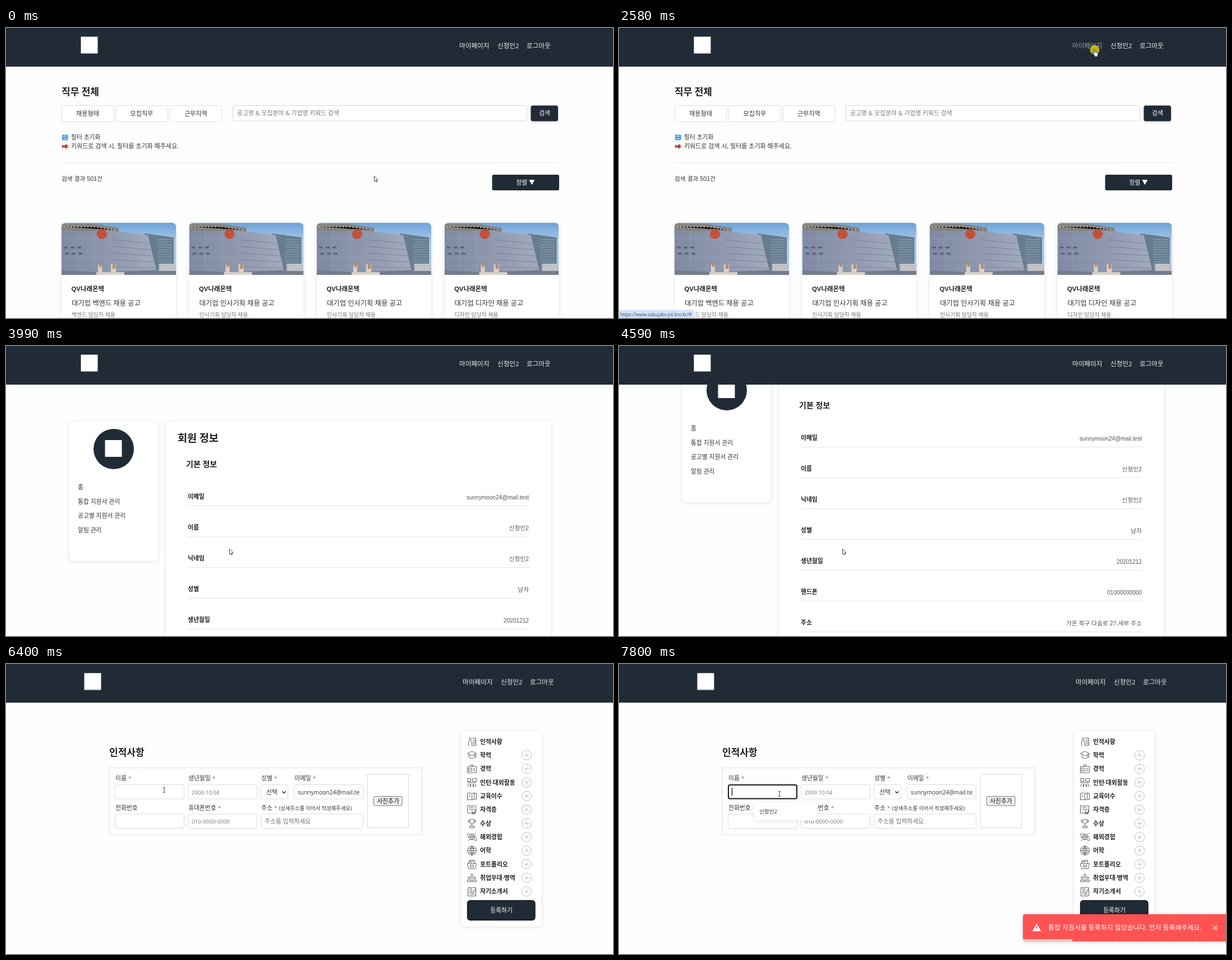
Write an HTML page that moves like this. It is 1082 px wide and 518 px high and loops after 8 s.

```html
<!DOCTYPE html>
<html lang="ko">
<head>
<meta charset="utf-8">
<title>채용 마이페이지</title>
<style>
html, body { margin: 0; width: 100%; height: 100%; overflow: hidden; background: #fefefe; }
svg { display: block; width: 100%; height: 100%; }
text { font: 10.8px "Open Sans", "Noto Sans CJK KR", sans-serif; fill: #333; white-space: pre; }
.arial { font-family: "Liberation Sans", "Noto Sans CJK KR", sans-serif; }
.b { font-weight: 600; fill: #1c1f24; }
.mid { text-anchor: middle; }
.end { text-anchor: end; fill: #555; }
.w { fill: #fff; }
.hint { fill: #777; }
.h1 { font-size: 17px; }
.nav { font-size: 11.6px; fill: #f1f1f1; }
.star { fill: #e2673c; }
.dark { fill: #212b36; }
.box { fill: #fff; stroke: #dcdcdc; }
.rule { stroke: #e6e6e6; }
.card { fill: #fff; filter: drop-shadow(0 1px 3px rgba(0,0,0,.12)); }
.icon { fill: none; stroke: #4a4f55; stroke-width: .9; stroke-linejoin: round; }
.plus { fill: none; stroke: #b9bcc0; }
.url { font-size: 8.2px; fill: #3d4a5c; }
.bar { fill: #d3e3fd; }

.k { animation: 8s step-end infinite; }
#list { animation-name: list; }
#mypage { animation-name: mypage; }
#form { animation-name: form; }
#head { animation-name: head; }
#navMy { animation-name: navMy; }
#navUser { animation-name: navUser; }
#url1 { animation-name: url1; }
#url2 { animation-name: url2; }
#before { animation-name: before; }
#after { animation-name: after; }
#scroll { animation-name: scroll; }
#focus { animation-name: focus; }
#fill { animation-name: fill; }
#toast { animation-name: toast; }
#left { animation: left 8s steps(6) infinite; transform-origin: 720px 0; }
#cursor { animation-name: cursor; }
#arrow { animation-name: arrow; }
#hand { animation-name: hand; }
#beam { animation-name: beam; }
#click { animation-name: click; }

@keyframes list { 0% { opacity: 1 } 34.9%, to { opacity: 0 } }
@keyframes mypage { 0% { opacity: 0 } 34.9% { opacity: 1 } 74.9%, to { opacity: 0 } }
@keyframes form { 0% { opacity: 0 } 74.9%, to { opacity: 1 } }
@keyframes head { 0% { transform: none } 74.9%, to { transform: translate(6px, .5px) } }
@keyframes navMy {
  0%, 17.2%, 37.4%, to { fill: #f1f1f1 }
  14.7%, 19.7% { fill: #9a9fa5 }
}
@keyframes navUser { 0%, 19.7%, to { fill: #f1f1f1 } 17.2% { fill: #9a9fa5 } }
@keyframes url1 { 0%, 34.9%, to { opacity: 0 } 24.7% { opacity: 1 } }
@keyframes url2 { 0%, 39.9%, to { opacity: 0 } 34.9% { opacity: 1 } }
@keyframes before { 0% { opacity: 1 } 39.9%, to { opacity: 0 } }
@keyframes after { 0% { opacity: 0 } 39.9%, to { opacity: 1 } }
@keyframes scroll {
  0% { transform: none }
  54.8% { transform: translateY(-60px) }
  57.3%, to { transform: translateY(-105px) }
}
@keyframes focus { 0% { opacity: 0 } 87.4%, to { opacity: 1 } }
@keyframes fill { 0% { opacity: 0 } 89.9%, to { opacity: 1 } }
@keyframes toast {
  0% { transform: translateX(400px) }
  87.4% { transform: translateX(35px) }
  89.9% { transform: translateX(3px) }
  92.4%, to { transform: none }
}
@keyframes left { 0%, 82.4% { transform: none } 97.4%, to { transform: scaleX(.243) } }
@keyframes cursor {
  0% { transform: translate(656px, 264px) }
  2.3% { transform: translate(704px, 218px) }
  4.8% { transform: translate(776px, 138px) }
  7.3% { transform: translate(818px, 95px) }
  12.2% { transform: translate(835px, 63px) }
  14.7% { transform: translate(852px, 37px) }
  17.2% { transform: translate(893px, 33px) }
  19.7% { transform: translate(855px, 36px) }
  24.7% { transform: translate(851px, 37px) }
  29.7% { transform: translate(848px, 38px) }
  34.9% { transform: translate(849px, 39px) }
  37.4% { transform: translate(842px, 52px) }
  39.9% { transform: translate(520px, 250px) }
  42.3% { transform: translate(285px, 356px) }
  47.4% { transform: translate(350px, 359px) }
  49.8% { transform: translate(398px, 362px) }
  59.8% { transform: translate(340px, 318px) }
  62.3% { transform: translate(262px, 252px) }
  64.8% { transform: translate(216px, 203px) }
  67.3% { transform: translate(199px, 182px) }
  69.8% { transform: translate(196px, 177px) }
  77.4% { transform: translate(245px, 204px) }
  79.9% { transform: translate(282px, 225px) }
  82.4% { transform: translate(284px, 227px) }
  84.9%, to { transform: translate(286px, 232px) }
}
@keyframes arrow { 0%, 37.4%, 74.9% { opacity: 1 } 14.7%, 67.3%, 79.9%, to { opacity: 0 } }
@keyframes hand { 0%, 37.4%, 74.9%, to { opacity: 0 } 14.7%, 67.3% { opacity: 1 } }
@keyframes beam { 0% { opacity: 0 } 79.9%, to { opacity: 1 } }
@keyframes click {
  0%, 34.9%, 74.9%, 89.9%, to { opacity: 0 }
  32.2%, 72.4%, 87.4% { opacity: .68 }
}
</style>
</head>
<body>
<svg viewBox="0 0 1082 518">
  <defs>
    <linearGradient id="sky" x2="0" y2="1">
      <stop stop-color="#6ca3da"/><stop offset=".35" stop-color="#a9c8e6"/>
    </linearGradient>
    <linearGradient id="wall" x2="1">
      <stop stop-color="#7f8aa3"/><stop offset=".45" stop-color="#8d96ac"/><stop offset="1" stop-color="#a3abbd"/>
    </linearGradient>
    <clipPath id="photoClip"><path d="M0 93V8q0-8 8-8h188q8 0 8 8v85z"/></clipPath>
    <clipPath id="mailClip"><path d="M519 216h112v25H519z"/></clipPath>
    <g id="photo" clip-path="url(#photoClip)">
      <path fill="url(#sky)" d="M0 0h204v93H0z"/>
      <path fill="#85827f" d="M0 2h58l44 7v8L0 15z"/>
      <path stroke="#b4b3b1" stroke-dasharray="2 4" stroke-width="3" d="M4 7h54l40 6"/>
      <path fill="#667c8f" d="M148 19l52 7v67h-52z"/>
      <path stroke="#8499ab" stroke-dasharray="1.5 3" stroke-width="26" d="M184 29v60"/>
      <path fill="url(#wall)" d="M0 13l42 2 36-2 76 9 17 71H0z"/>
      <path fill="none" stroke="#707a92" stroke-width=".8" d="M88 30l68 7M89 42l70 6M90 54l72 5M91 66l74 4M92 78l75 3"/>
      <path fill="none" stroke="#9ba4b7" stroke-width=".6" d="M0 30l86-2M0 62l88-1M28 14v79M58 14v79M88 14l6 79"/>
      <path stroke="#56627b" stroke-width="3" stroke-dasharray="7 5" d="M4 44h36M6 55h34"/>
      <path fill="#747c8d" d="M0 85l70 3 134-5v10H0z"/>
      <path fill="#d8d0c8" d="M65 75h7v18h-7zM88 74h9v19h-9zM62 88h50v5H62z"/>
      <path fill="#b98a66" d="M67 70h4v9h-4zM91 74h5v8h-5z"/>
      <path fill="#bfc3c8" d="M174 73h30v13h-30z"/>
      <circle cx="72" cy="20" r="9" fill="#c4503c"/>
    </g>
  </defs>

  <g id="list" class="k">
    <text class="b h1" x="99" y="120">직무 전체</text>
    <g id="filters"></g>
    <rect class="box" x="404.5" y="138.5" width="524" height="27.5" rx="3.5" style="stroke:#d2d6da"/>
    <text class="hint" x="412" y="155.5">공고명 &amp; 모집분야 &amp; 기업명 키워드 검색</text>
    <rect class="dark" x="935.5" y="138.5" width="48.5" height="28" rx="3.5" style="filter:drop-shadow(0 1px 2px #0003)"/>
    <text class="mid w" x="960" y="156">검색</text>
    <rect x="100" y="190.5" width="10.5" height="10" rx="1.8" fill="#3b9fe4"/>
    <path d="M102.5 195a2.8 2.8 0 0 1 5-1.200M108 196a2.8 2.8 0 0 1-5 1.2" fill="none" stroke="#fff" stroke-width="1.2"/>
    <text x="116" y="198.5">필터 초기화</text>
    <path fill="#c92f33" d="M100 209h3v5h-3zM104 209.500l5-2v8l-5-2z"/>
    <path stroke="#7c1d22" d="M104.5 209v5M110.5 209.500v4"/>
    <text x="116" y="214.5" style="font-size:11px">키워드로 검색 시, 필터를 초기화 해주세요.</text>
    <path class="rule" d="M99 240.500h887"/>
    <text class="arial" x="99" y="273" style="font-size:10.7px">검색 결과 501건</text>
    <rect class="dark" x="866.5" y="262" width="119.5" height="28" rx="3"/>
    <text class="mid w" x="926" y="280">정렬 ▼</text>
    <g id="cards"></g>
  </g>

  <g id="mypage" class="k">
    <g id="scroll" class="k">
      <rect class="card" x="113" y="134.5" width="158" height="249.5" rx="7"/>
      <circle class="dark" cx="192" cy="184" r="36"/>
      <path class="w" d="M176.500 168h30v30h-30z"/>
      <g id="menu"></g>
      <rect class="card" x="285" y="134.5" width="686.5" height="700" rx="7"/>
      <text class="b" x="306" y="170.5" style="font-size:18.5px">회원 정보</text>
      <text class="b" x="321" y="216" style="font-size:14px">기본 정보</text>
      <g id="rows"></g>
      <text id="before" class="k end" x="932" y="438">여자</text>
      <g id="after" class="k"></g>
    </g>
  </g>

  <g id="form" class="k">
    <text class="b h1" x="184" y="164">인적사항</text>
    <rect class="box" x="184" y="185.5" width="557.5" height="119.5"/>
    <g id="fields"></g>
    <text x="464" y="232.5">선택</text>
    <path d="M492.500 227.500l3 3 3-3" fill="none" stroke="#222" stroke-width="1.5"/>
    <text class="hint" x="331" y="232.5" style="font-size:9.7px">2000.10.04</text>
    <text clip-path="url(#mailClip)" x="520" y="232.5" style="font-size:10.2px">sunnymoon24@mail.test</text>
    <text class="hint" x="331" y="285" style="font-size:9.8px">010-0000-0000</text>
    <text class="hint" x="461" y="285">주소를 입력하세요</text>
    <rect class="box" x="644.5" y="197" width="73" height="95.5"/>
    <rect x="655.5" y="236.5" width="50.5" height="16.5" rx="2" fill="#efefef" stroke="#767676"/>
    <text class="mid" x="681" y="249" style="fill:#111">사진추가</text>
    <g id="focus" class="k">
      <rect x="195" y="216" width="122" height="24.5" rx="3" fill="#fff" stroke="#15181c" stroke-width="2"/>
      <path stroke="#111" stroke-width="1.3" d="M201.500 221v14"/>
    </g>
    <g id="fill" class="k">
      <rect class="card" x="241" y="247" width="112" height="32.5" rx="4"/>
      <text x="250" y="266.5" style="font-size:9.6px">신청인2</text>
    </g>
    <rect class="card" x="811" y="120" width="143.5" height="348.5" rx="4"/>
    <g id="parts"></g>
    <rect class="dark" x="822.5" y="422.5" width="120.5" height="35" rx="5" stroke="#0f151c" stroke-width="1.3"/>
    <text class="mid w" x="883" y="444">등록하기</text>
    <g id="toast" class="k">
      <rect x="720" y="447" width="400" height="48.5" rx="4" fill="#ff5252" style="filter:drop-shadow(0 1px 3px #0003)"/>
      <path class="w" stroke="#fff" stroke-width="1.5" stroke-linejoin="round" d="M744.500 465l6.500 11.500h-13z"/>
      <path stroke="#ff5252" stroke-width="1.7" d="M744.500 468v4.200m0 1.300v1.600"/>
      <text class="w" x="765" y="474.5" style="font-size:11.9px">통합 지원서를 등록하지 않았습니다. 먼저 등록해주세요.</text>
      <path stroke="#ffa8a8" stroke-width="2.6" d="M1059 467.500l7 7m0-7l-7 7"/>
      <rect id="left" x="720" y="491.5" width="362" height="4" fill="#fff" opacity=".7"/>
    </g>
  </g>

  <path class="dark" d="M0 0h1082v69H0z"/>
  <g id="head" class="k">
    <path class="w" d="M133.500 15.500h30v30h-30z"/>
    <text id="navMy" class="k nav" x="808" y="36">마이페이지</text>
    <text id="navUser" class="k nav" x="876" y="36">신청인2</text>
    <text class="nav" x="928" y="36">로그아웃</text>
  </g>

  <g id="url1" class="k">
    <path class="bar" d="M0 503.500h131q3.500 0 3.500 3.500v11H0z"/>
    <text class="url" x="2" y="514.5">https://www.sabujaks-jot.kro.kr/#</text>
  </g>
  <g id="url2" class="k">
    <path class="bar" d="M0 503.500h190q3.500 0 3.500 3.500v11H0z"/>
    <text class="url" x="2" y="514.5">https://www.sabujaks-jot.kro.kr/seeker/mypage#</text>
  </g>

  <g id="cursor" class="k">
    <circle id="click" class="k" r="8.5" cy="1" fill="#ffee00"/>
    <path id="arrow" class="k" d="M.5.5v9.600l2.200-2 1.500 3.400 1.500-.7-1.500-3.300h2.900z" fill="#fff" stroke="#222" stroke-width=".8"/>
    <path id="hand" class="k" d="M-1 1.200q0-1.200 1-1.200t1 1.200v3.800l3.600.9q1.300.4 1.200 1.700l-.7 3.400v2h-5.400v-1.600l-3.200-4.200q-.2-1.400 1-1.100l1.500 1.400z" fill="#fff" stroke="#222" stroke-width=".8"/>
    <path id="beam" class="k" d="M-2-4.500h1.500l.5.500.5-.5h1.500M0-4v8M-2 4.500h1.500l.5-.5.5.5h1.500" fill="none" stroke="#222" stroke-width=".9"/>
  </g>
</svg>
<script>
const put = (id, items, draw) => {
  document.getElementById(id).innerHTML = items.map(draw).join('');
};
const text = (x, y, str, cls = '', size = 10.8) =>
  `<text class="${cls}" x="${x}" y="${y}" style="font-size:${size}px">${str}</text>`;
const box = (x, y, w, h) =>
  `<rect class="box" x="${x}" y="${y}" width="${w}" height="${h}" rx="3"/>`;

put('filters', ['채용형태', '모집직무', '근무지역'], (name, i) => {
  const x = 99.5 + i * 96.4;
  return box(x, 138.5, 92.5, 28.8) + text(x + 46, 156.5, name, 'mid', 11.1);
});

put('cards', ['백엔드', '인사기획', '인사기획', '디자인'], (job, i) => `
  <g transform="translate(${99 + i * 227.5} 348)">
    <rect class="card" width="204" height="230" rx="8"/>
    <use href="#photo"/>
    ${text(17.5, 122, 'QV나래온텍', 'b arial', 11.4)}
    ${text(18, 147.5, `대기업 ${job} 채용 공고`, '', 12.3)}
    ${text(18, 168, `${job} 담당자 채용`, 'hint', 9.9)}
  </g>`);

put('menu', ['홈', '통합 지원서 관리', '공고별 지원서 관리', '알림 관리'],
  (name, i) => text(128, 256 + i * 25.6, name));

put('rows', ['이메일', '이름', '닉네임', '성별', '생년월일', '핸드폰', '주소'], (name, i) =>
  text(324, 273 + i * 55, name, 'b') + `<path class="rule" d="M324 ${285.5 + i * 55}h608"/>`);

const profile = ['sunnymoon24@mail.test', '신청인2', '신청인2', '남자', '20201212',
  '01000000000', '가온 북구 다솜로 27,세부 주소'];
put('after', profile, (value, i) =>
  text(932, 273.5 + i * 55, value, 'end arial', /[가-힣]/.test(value) ? 10.7 : 10.1));

const star = ' <tspan class="star">*</tspan>';
const note = ' <tspan style="font-size:9.3px">(상세주소를 이어서 작성해주세요)</tspan>';
const fields = [
  ['이름' + star, 195, 0, 123], ['생년월일' + star, 325, 0, 123],
  ['성별' + star, 455, 0, 48], ['이메일' + star, 514, 0, 123],
  ['전화번호', 195, 1, 123], ['휴대폰번호' + star, 325, 1, 123],
  ['주소' + star + note, 455, 1, 182]
];
put('fields', fields, ([label, x, row, w]) =>
  text(x, 208 + row * 53, label) + box(x - .5, 215.5 + row * 52.5, w, 25.5));

// Each icon is drawn in a 16 by 16 box.
const parts = [
  ['인적사항', 'M2 16V8l3-2 3 2v8M3 3a2 2 0 1 0 4 0 2 2 0 1 0-4 0M9 2h6v13H9M10 6h4M10 9h4M10 12h4'],
  ['학력', 'M0 5l8-4 8 4-8 4zM3 7v5q5 4 10 0V7M15 6v7'],
  ['경력', 'M0 4h16v11H0zM6 4V1h4v3M2 7h5v5H2zM9 8h5M9 11h5'],
  ['인턴·대외활동', 'M0 1h6v5H0zM9 1h7v5H9zM1 16v-4l2-2 2 2v4M6 16v-4l2-2 2 2v4M11 16v-4l2-2 2 2v4M0 8h16'],
  ['교육이수', 'M0 3l5-1 3 2 4-2v11l-4 2-3-1-5 1zM8 4v11M12 3h4v11h-4M2 6h3M2 9h3'],
  ['자격증', 'M0 1h15v13H0zM3 4h8M3 7h5M8 10a3 3 0 1 0 6 0 3 3 0 1 0-6 0M9 12v4l2-1 2 1v-4'],
  ['수상', 'M4 1h8v5q-4 6-8 0zM4 3H1q0 4 4 4M12 3h3q0 4-4 4M8 9v4M4 13h8v3H4z'],
  ['해외경험', 'M3 8a5 5 0 1 0 10 0 5 5 0 1 0-10 0M1 1l5 3M15 1l-5 5M0 8h16M8 3q-4 5 0 10 4-5 0-10M1 15l4-3M15 15l-4-3M0 2v4M16 10v5'],
  ['어학', 'M0 8a8 8 0 1 0 16 0 8 8 0 1 0-16 0M8 0q-7 8 0 16 7-8 0-16M8 0v16M0 8h16M2 4h12M2 12h12'],
  ['포트폴리오', 'M0 7h16l-2 9H2zM2 7V4h4l1 2M4 4V1h9v6M6 3h5M5 10h6v3H5z'],
  ['취업우대·병역', 'M6 3a2 2 0 1 0 4 0 2 2 0 1 0-4 0M5 9V7h6v2M1 8a2 2 0 1 0 4 0 2 2 0 1 0-4 0M11 8a2 2 0 1 0 4 0 2 2 0 1 0-4 0M0 15v-3h6v3zM10 15v-3h6v3zM8 9v6'],
  ['자기소개서', 'M1 1h14v15H1zM4 5a2 2 0 1 0 4 0 2 2 0 1 0-4 0M4 13V9h4M14 3l-6 8-1 3 3-2 5-7M10 12l3 2']
];
put('parts', parts, ([name, path], i) => {
  const y = 138.5 + i * 24.35;
  const plus = `<path class="plus" d="M919.5 ${y}a8.5 8.5 0 1 0 17 0 8.5 8.5 0 1 0-17 0M923.5 ${y}h9M928 ${y - 4.5}v9"/>`;
  return `<path class="icon" transform="translate(822.5 ${y - 8})" d="${path}"/>`
    + text(845, y + 4, name, 'b') + (i ? plus : '');
});
</script>
</body>
</html>
```
